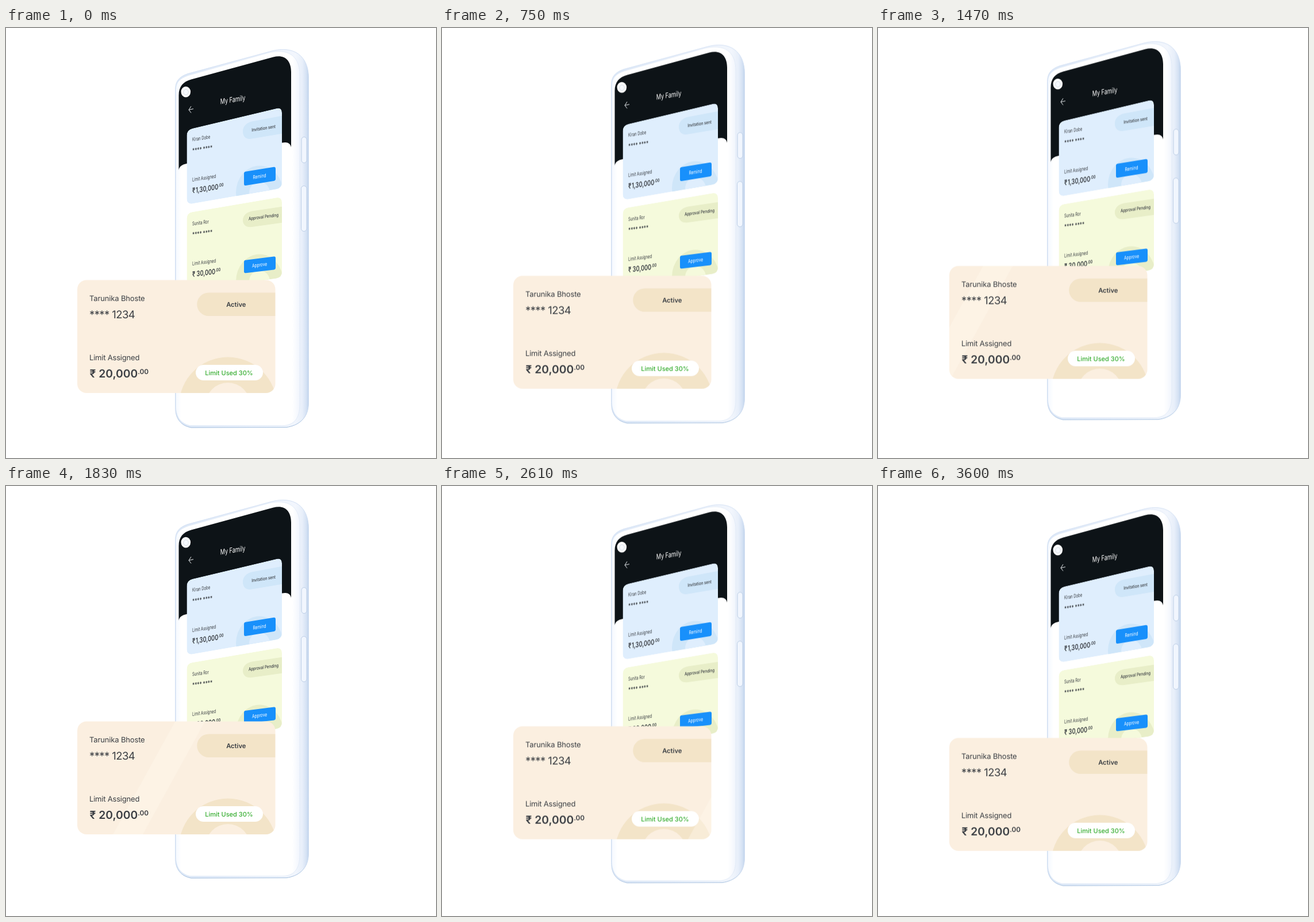
Write an HTML page that moves like this. It is 748x748 px and loops after 3630 ms.

```html
<!DOCTYPE html>
<html lang="en">
<head>
<meta charset="utf-8">
<title>Family cards</title>
<style>
  html, body { margin: 0; width: 100%; height: 100%; overflow: hidden; background: #fff; }
  svg { display: block; width: 100vw; height: 100vh; }
  text { font-family: Inter, "Noto Sans", sans-serif; fill: #3a3e43; text-rendering: geometricPrecision; white-space: pre; }
  .phone, .card { animation: 1815ms cubic-bezier(.364, 0, .636, 1) infinite alternate; }
  .phone { animation-name: lift; animation-delay: -255ms; }
  .card { animation-name: rise; animation-delay: -3500ms; }
  .sheen { animation: sweep 3630ms linear infinite; }
  @keyframes lift { from { transform: translateY(.3px); } to { transform: translateY(-14.2px); } }
  @keyframes rise { from { transform: translateY(.3px); } to { transform: translateY(-29.3px); } }
  @keyframes sweep { from { transform: translateX(-271px); } to { transform: translateX(854px); } }
  .mid { text-anchor: middle; }
  .bold { font-weight: 600; }
</style>
</head>
<body>
<svg viewBox="0 0 748 748">
  <defs>
    <linearGradient id="side" gradientUnits="userSpaceOnUse" x1="294" x2="527" y1="0" y2="0">
      <stop offset="0" stop-color="#dbe7f7"/>
      <stop offset=".9" stop-color="#f2f6fd"/>
      <stop offset=".95" stop-color="#e8effa"/>
      <stop offset=".98" stop-color="#d5e2f4"/>
      <stop offset="1" stop-color="#bfd2eb"/>
    </linearGradient>
    <linearGradient id="rim" gradientUnits="userSpaceOnUse" x1="0" x2="0" y1="36" y2="696">
      <stop offset="0" stop-color="#d3e0f3"/>
      <stop offset=".95" stop-color="#cfddf1"/>
      <stop offset="1" stop-color="#9fbbdc"/>
    </linearGradient>
    <linearGradient id="bezel" gradientUnits="userSpaceOnUse" x1="294" x2="511" y1="0" y2="0">
      <stop offset="0" stop-color="#f3f8ff"/>
      <stop offset=".05" stop-color="#fff"/>
      <stop offset=".94" stop-color="#fff"/>
      <stop offset="1" stop-color="#f1f5fd"/>
    </linearGradient>
    <clipPath id="blueClip"><path id="blueShape"/></clipPath>
    <clipPath id="greenClip"><path id="greenShape"/></clipPath>
    <clipPath id="cardClip"><rect x="124" y="438.5" width="344.5" height="196.5" rx="16"/></clipPath>
  </defs>

  <g class="phone">
    <path fill="url(#side)" stroke="url(#rim)" d="M294.500 108C294.500 92 302 85 316 80L462 40.500C500 30.500 526.500 48 526.500 88V652C526.500 680 508 692 488 695L322 695.500C304 692 294.500 680 294.500 660Z"/>
    <path fill="url(#bezel)" stroke="#dfe9f7" stroke-width=".8" d="M295.500 108C295.500 94 303 88 317 83L455 44C490 35 511 48 511 82V655C511 680 501 691 482 692H320C303 688 295.500 676 295.500 658Z"/>
    <g fill="#f1f6fe" stroke="#b7cae4" stroke-width=".9">
      <rect x="514" y="190" width="9" height="45" rx="4.500"/>
      <rect x="513.500" y="275" width="9.500" height="79" rx="4.700"/>
    </g>
    <path fill="#0d1317" d="M300.500 248V118C300.500 102 308 94 322 90L465 51C484 46 496 56 496 77V208C495 201 489 198 481 200L314 236.500C306 238 301 242 300.500 248Z"/>
    <ellipse cx="312.800" cy="111.500" rx="8.300" ry="9.400" fill="#fff"/>
    <ellipse cx="313" cy="112" rx="4.300" ry="5" fill="#f6f9fd" stroke="#d3dae3" stroke-width=".9"/>
    <path fill="none" stroke="#e9edf0" d="M326 141L318 142.800M322 136.500L318 142.800L322 148"/>
    <g id="screen"></g>
  </g>

  <g class="card" clip-path="url(#cardClip)">
    <path fill="#fbefe0" d="M124 438H469V635H124Z"/>
    <path fill="#f3e4c8" d="M469 460.500H352.500a20.250 20.250 0 0 0 0 40.500H469Z"/>
    <circle cx="386" cy="657.500" r="85" fill="#f3e4c8"/>
    <circle cx="386" cy="656" r="39" fill="#fbefe0"/>
    <rect x="330" y="586" width="117" height="27" rx="13.500" fill="#fff"/>
    <text x="400.300" y="484.600" font-size="11.200" class="mid bold">Active</text>
    <text x="388" y="603.700" font-size="11" font-weight="500" class="mid" style="fill:#35ad2f">Limit Used 30%</text>
    <path class="sheen" fill="#fff7ec" opacity=".42" d="M-2 438H50L-59 636H-111Z"/>
    <text x="145" y="474.500" font-size="13" letter-spacing="-.15">Tarunika Bhoste</text>
    <text x="145" y="504.500" font-size="18.500" letter-spacing="-.6">**** 1234</text>
    <text x="145" y="577.500" font-size="13" letter-spacing="-.2">Limit Assigned</text>
    <text x="145.500" y="607.700" font-size="19.300" class="bold">₹ 20,000<tspan font-size="11.800" dy="-6">.00</tspan></text>
  </g>
</svg>
<script>
  const screen = document.getElementById('screen');

  // Rounded quadrilateral through the given corners
  function quad(points, r) {
    const toward = (a, b) => {
      const k = r / Math.hypot(b[0] - a[0], b[1] - a[1]);
      return [a[0] + (b[0] - a[0]) * k, a[1] + (b[1] - a[1]) * k];
    };
    return points.map((p, i) => {
      const prev = points[(i + 3) % 4], next = points[(i + 1) % 4];
      return `${i ? 'L' : 'M'}${toward(p, prev)}Q${p} ${toward(p, next)}`;
    }).join('') + 'Z';
  }

  // Text squeezed and slanted to follow the screen's perspective
  const label = (str, x, y, size, squeeze, slope, attrs = '') =>
    `<text transform="matrix(${squeeze} ${squeeze * slope} 0 1 ${x} ${y})" font-size="${size}" ${attrs}>${str}</text>`;

  function account(c) {
    const shape = quad(c.corners, 10);
    document.getElementById(c.id + 'Shape').setAttribute('d', shape);
    const [name, stars, limit, amount] = c.lines;
    const s = c.slope, white = 'class="mid" style="fill:#fff"';
    return `<g clip-path="url(#${c.id}Clip)">
      <path d="${shape}" fill="${c.fill}"/>
      <path d="${c.tag}" fill="${c.tint}"/>
      <ellipse cx="441" cy="${c.arc}" rx="41" ry="47" fill="${c.tint}"/>
      <ellipse cx="441" cy="${c.arc}" rx="18" ry="19" fill="${c.fill}"/></g>
      <path d="${quad(c.button, 3)}" fill="#1890fb"/>` +
      label(c.name, 324, name, 9, .66, s) +
      label('**** ****', 324, stars, 11, .7, s, 'class="bold"') +
      label('Limit Assigned', 324, limit, 9, .66, s) +
      label(`${c.amount}<tspan font-size="8" dy="-4">.00</tspan>`, 324, amount, 13, .71, s, 'class="bold"') +
      label(c.status, 448, c.statusY, 8, .77, s, 'class="mid" font-weight="500"') +
      label(c.action, 441, c.actionY, 9, .73, s, white);
  }

  screen.innerHTML =
    label('My Family', 394.5, 129.5, 13, .7, -.15, 'class="mid" style="fill:#fff"') +
    account({
      id: 'blue', fill: '#dfeefd', tint: '#cfe6f9', slope: -.155,
      corners: [[314.5, 177.5], [480, 138], [480, 279], [314.5, 307.5]],
      tag: 'M481 153L428 163C418 165 412 172 412 180C412 190 418 195 428 193L481 184Z',
      arc: 287, button: [[414, 250.5], [469, 241.8], [469, 265.8], [414, 274.8]],
      lines: [197.5, 217.5, 267.5, 288], name: 'Kiran Dobe', amount: '₹\u200a1,30,000',
      status: 'Invitation sent', statusY: 177.5, action: 'Remind', actionY: 261.5
    }) +
    account({
      id: 'green', fill: '#f5fadc', tint: '#e8eec8', slope: -.13,
      corners: [[314.5, 322], [480, 294], [480, 434.5], [314.5, 458]],
      tag: 'M481 311L428 319C418 321 412 327 412 335C412 343 418 348 428 346.5L481 339Z',
      arc: 441, button: [[414, 404.5], [469, 397.6], [469, 420.5], [414, 427]],
      lines: [344, 363.5, 413.5, 433.5], name: 'Sunita Ror', amount: '₹ 30,000',
      status: 'Approval Pending', statusY: 331.5, action: 'Approve', actionY: 415.5
    });
</script>
</body>
</html>
```
